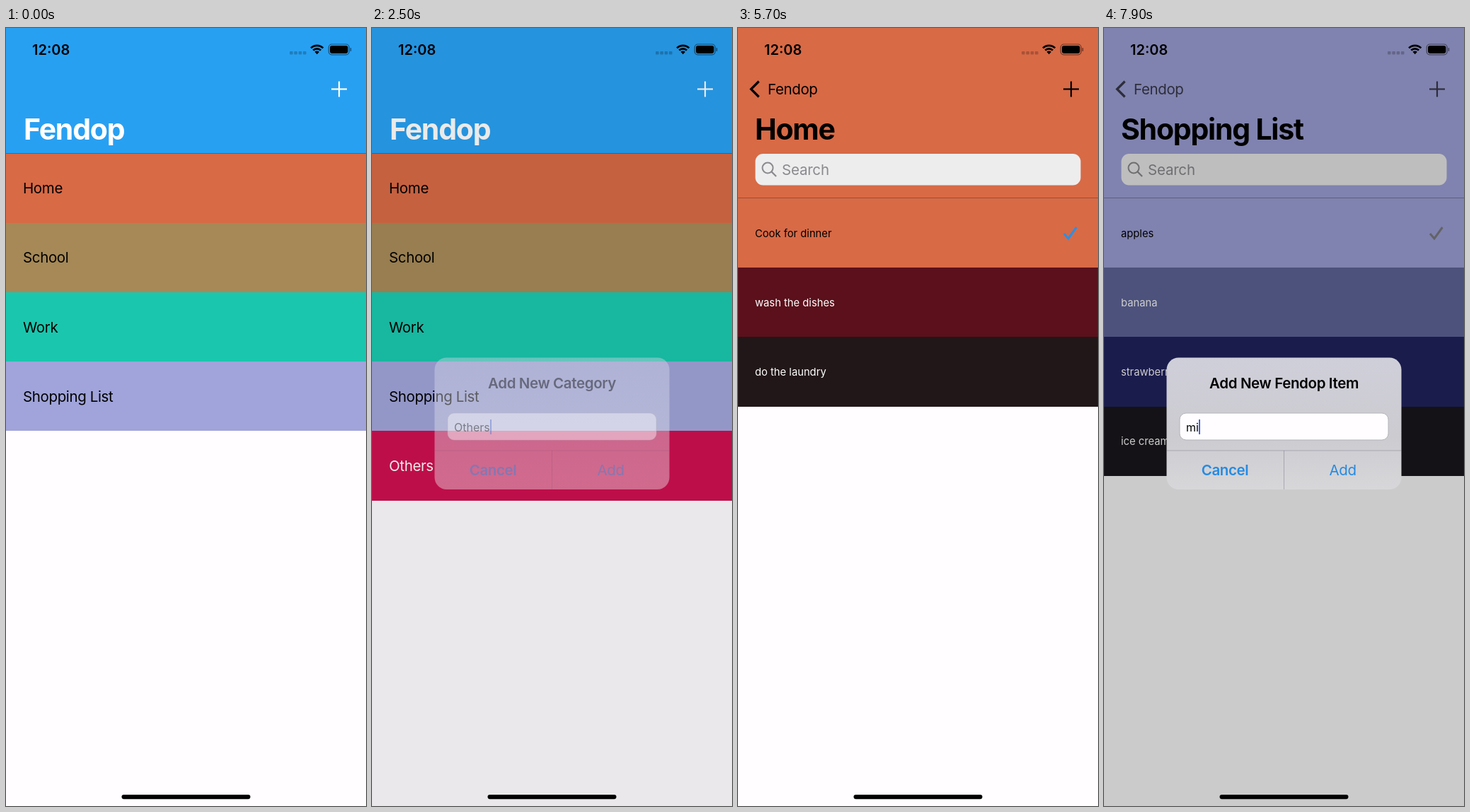
Animation of 509 by 1101 pixels, one loop 8000 ms. Source, as an HTML page with a canvas:

```html
<!DOCTYPE html>
<html lang="en">
<head>
<meta charset="utf-8">
<title>To-do lists</title>
<style>
  html, body { margin: 0; width: 100%; height: 100%; overflow: hidden; background: #fffdff; }
  canvas { display: block; width: 509px; height: 1101px; }
</style>
</head>
<body>
<canvas id="stage"></canvas>
<script>
const W = 509, H = 1101, ROW = 98.25, LOOP = 8000, STEP = 100;
const APP = 'Fendop', BLUE = '#28a0f2', LINK = '#248ae2', PAPER = '#fffdff';
const canvas = document.getElementById('stage');
const ctx = canvas.getContext('2d');
const dpr = window.devicePixelRatio || 1;
canvas.width = W * dpr;
canvas.height = H * dpr;

const categories = [
  ['Home', '#d86a46'], ['School', '#a68957'], ['Work', '#1ac7ae'],
  ['Shopping List', '#a0a4da'], ['Others', '#cf0f50', '#fff'],
];
const home = {
  title: 'Home', color: '#d86a46',
  items: [['Cook for dinner', '#d86a46'], ['clean the bedroom', '#982719', '#fff'],
    ['wash the dishes', '#5b101b', '#fff'], ['do the laundry', '#211718', '#fff']],
};
const shop = {
  title: 'Shopping List', color: '#a0a4da',
  items: [['apples', '#a0a4da'], ['banana', '#5f679b', '#fff'],
    ['strawberries', '#20235f', '#fff'], ['ice cream', '#19161b', '#fff']],
};

const clamp = v => Math.min(1, Math.max(0, v));
const ramp = (t, from, to) => clamp((t - from) / (to - from));
const smooth = v => v * v * (3 - 2 * v);
const lerp = (a, b, v) => a + (b - a) * v;
const mix = (a, b, v) => `color-mix(in srgb, ${a}, ${b} ${v * 100}%)`;

// Critically damped spring from 0 to 1.
function spring(ms) {
  if (ms <= 0) return 0;
  if (ms > 620) return 1;
  const x = ms * 0.016;
  return 1 - (1 + x) * Math.exp(-x);
}

function rect(x, y, w, h, fill) {
  const left = Math.round(x), top = Math.round(y);
  ctx.fillStyle = fill;
  ctx.fillRect(left, top, Math.round(x + w) - left, Math.round(y + h) - top);
}

function round(x, y, w, h, r, fill, stroke) {
  ctx.beginPath();
  ctx.roundRect(x, y, w, h, r);
  if (fill) { ctx.fillStyle = fill; ctx.fill(); }
  if (stroke) { ctx.strokeStyle = stroke; ctx.stroke(); }
}

function line(points, color, width) {
  ctx.beginPath();
  points.forEach(([x, y]) => ctx.lineTo(x, y));
  ctx.strokeStyle = color;
  ctx.lineWidth = width;
  ctx.stroke();
}

// Text centred on cap height at y.
function text(str, x, y, size, { color = '#000', weight = 400, track = 0, align = 'left' } = {}) {
  ctx.font = `${weight} ${size}px Inter, Roboto, sans-serif`;
  ctx.letterSpacing = `${track * size}px`;
  ctx.textAlign = align;
  ctx.fillStyle = color;
  ctx.fillText(str, x, y + size * 0.364);
  return ctx.measureText(str).width;
}

function faded(alpha, draw) {
  if (alpha <= 0) return;
  ctx.save();
  ctx.globalAlpha *= alpha;
  draw();
  ctx.restore();
}

function drawCategories(s) {
  const x = -0.3 * W * s.push;
  rect(0, 0, W, H, PAPER);
  categories.slice(0, s.count).forEach(([name, color, ink], i) => {
    const y = 177.3 + i * ROW;
    rect(0, y, W, ROW, s.pressed === i ? '#d0cfd4' : color);
    text(name, x + 24, y + 49.3, 20.5, { color: ink, track: -0.018 });
  });
  rect(0, 0, W, H, `rgba(0,0,0,${0.1 * s.push})`);
}

function drawSwiped(y, height, swipe) {
  const edge = W * (1 - swipe);
  rect(edge, y, W - edge, height, '#ff3b30');
  if (height > 60) {
    text('Delete', edge + Math.min(45, (W - edge) / 2), y + height / 2, 17,
      { color: '#fff', align: 'center' });
  }
}

function drawItems(s) {
  const left = W * (1 - s.push);
  ctx.save();
  ctx.beginPath();
  ctx.rect(left, 0, W, H);
  ctx.clip();
  rect(left, 0, W, H, PAPER);
  let y = 240.8;
  s.list.items.forEach(([name, color, ink], i) => {
    const leaving = s.list === home && i === 1;
    const height = leaving ? ROW * (1 - s.collapse) : ROW;
    const x = left - (leaving ? W * s.swipe : 0);
    if (height < 0.5) return;
    ctx.save();
    ctx.beginPath();
    ctx.rect(0, Math.round(y), W, Math.round(y + height) - Math.round(y));
    ctx.clip();
    rect(x, y, W, ROW, color);
    text(name, x + 24, y + 49.5, 14.75, { color: ink });
    if (leaving && s.swipe > 0) drawSwiped(y, height, s.swipe);
    ctx.restore();
    if (i === 0) {
      line([[x + 461, 291], [x + 467, 298], [x + 478.5, 282]],
        mix('#2a90e6', '#7c7c80', s.alert), 3);
    }
    y += height;
  });
  ctx.restore();
  const shade = ctx.createLinearGradient(left - 11, 0, left, 0);
  shade.addColorStop(0, 'rgba(0,0,0,0)');
  shade.addColorStop(1, 'rgba(0,0,0,.06)');
  rect(left - 11, 177, 11, H - 177, shade);
}

function drawSearch(x) {
  const gray = '#8a8a8e';
  round(x + 24.5, 178, 460, 44.5, 11, '#ededee');
  ctx.beginPath();
  ctx.arc(x + 42, 198, 7.5, 0, 7);
  ctx.strokeStyle = gray;
  ctx.lineWidth = 2;
  ctx.stroke();
  line([[x + 47.3, 203.3], [x + 54, 210]], gray, 2.3);
  text('Search', x + 62, 200.5, 20.5, { color: gray, track: -0.01 });
}

function drawBar(s) {
  const p = s.push, height = lerp(177.5, 241, p), slide = W * (1 - p);
  const dark = mix('#000', '#38384a', s.alert);
  rect(0, 0, W, height, mix(BLUE, s.list.color, p));
  rect(0, height - 1, W, 1, `rgba(0,0,0,${p > 0 && p < 1 ? 0.08 : 0.28})`);

  ctx.save();
  ctx.beginPath();
  ctx.rect(0, 0, W, height);
  ctx.clip();
  faded(p, () => {
    text(s.list.title, 24 + slide, 143, 41, { weight: 700, track: -0.03 });
    drawSearch(slide);
  });
  ctx.restore();

  // The large title shrinks into the back button.
  const x = lerp(25, 42, p), y = lerp(143, 86.5, p), size = lerp(41, 20.5, p);
  faded(1 - p, () => text(APP, x, y, size, { color: '#fff', weight: 700, track: -0.03 }));
  faded(p * s.back, () => {
    text(APP, x, y, size, { track: -0.018, color: dark });
    line([[29.5, 75.5], [18.5, 86.5], [29.5, 97.5]], dark, 3.2);
  });

  faded(s.plus, () => {
    const ink = mix('#fff', dark, p);
    line([[460, 86.5], [482, 86.5]], ink, 2.2);
    line([[471, 75.5], [471, 97.5]], ink, 2.2);
  });
}

function drawAlert(s) {
  if (s.alert <= 0) return;
  const inList = s.push > 0.5, cx = 254.5, cy = 559.5;
  rect(0, 0, W, H, `rgba(0,0,0,${0.2 * s.alert})`);
  faded(s.alert, () => {
    ctx.translate(cx, cy);
    ctx.scale(s.zoom, s.zoom);
    ctx.translate(-cx, -cy);
    const glass = ctx.createLinearGradient(0, 466, 0, 653);
    const tones = inList ? ['#cfcfda', '#cccbd0', '#d7d6d9'] : ['#d5d8e8', '#e2e3ec', '#ebebed'];
    tones.forEach((c, i) => glass.addColorStop([0, 0.6, 1][i], c));
    round(88.5, 466.5, 332, 186.5, 17, glass);
    text(inList ? `Add New ${APP} Item` : 'Add New Category', cx, 503, 20.5,
      { weight: 600, track: -0.018, align: 'center' });
    ctx.lineWidth = 1;
    round(107, 545, 295, 38, 9, PAPER, '#b4b4b9');
    const width = text(s.typed, 116, 565, 16);
    rect(116 + width, 554, 2.4, 21, '#4668c8');
    const rule = 'rgba(60,60,80,.28)';
    line([[88.5, 598], [420.5, 598]], rule, 1);
    line([[254.5, 598], [254.5, 653]], rule, 1);
    text('Cancel', 171, 625.5, 20.5, { color: LINK, weight: 600, track: -0.018, align: 'center' });
    text('Add', 337.5, 625.5, 20.5, { color: LINK, track: -0.018, align: 'center' });
  });
}

function drawStatus() {
  text('12:08', 37, 30.5, 20, { weight: 600 });
  for (let i = 0; i < 4; i++) round(401 + i * 6.3, 33, 4.6, 4.6, 1, 'rgba(0,0,0,.22)');
  const from = -Math.PI * 0.75, to = -Math.PI * 0.25;
  ctx.strokeStyle = ctx.fillStyle = '#000';
  ctx.lineWidth = 2.7;
  for (const r of [7.7, 12.2]) {
    ctx.beginPath();
    ctx.arc(439.7, 37, r, from, to);
    ctx.stroke();
  }
  ctx.beginPath();
  ctx.moveTo(439.7, 37.3);
  ctx.arc(439.7, 37, 4.6, from, to);
  ctx.fill();
  ctx.lineWidth = 1.2;
  round(456.2, 23, 29, 14.8, 4.5, null, 'rgba(0,0,0,.5)');
  round(458, 24.9, 25.4, 11, 2.8, '#000');
  round(486.6, 28, 1.6, 5, 1, 'rgba(0,0,0,.5)');
  round(163.5, 1085, 182, 6.2, 3.1, '#000');
}

function typedAt(t) {
  const keys = t < 4000
    ? [['O', 1500], ['t', 1700], ['h', 1900], ['e', 2000], ['r', 2100], ['s', 2200]]
    : [['m', 7800], ['i', 7900]];
  return keys.filter(k => t >= k[1]).map(k => k[0]).join('');
}

function stateAt(t) {
  const second = t >= 6500;
  const opening = second ? ramp(t, 7300, 7600) : ramp(t, 900, 1250);
  const closing = second ? 0 : ramp(t, 2350, 2620);
  const firstPush = t < 5900 ? spring(t - 3180) : 1 - spring(t - 6010);
  const pressing = (a, b) => t >= a && t < b;
  return {
    list: second ? shop : home,
    push: second ? spring(t - 6660) : firstPush,
    pressed: pressing(3100, 4000) ? 0 : pressing(6600, 7300) ? 3 : -1,
    count: t < 2400 ? 4 : 5,
    alert: smooth(opening) * (1 - smooth(closing)),
    zoom: 1 + 0.15 * (1 - smooth(opening)),
    typed: typedAt(t),
    swipe: 0.6 * smooth(ramp(t, 4380, 4820)) + 0.4 * smooth(ramp(t, 4800, 5000)),
    collapse: smooth(ramp(t, 5000, 5350)),
    back: pressing(5900, 6000) ? 0.4 : 1,
    plus: pressing(900, 1000) || pressing(7300, 7400) ? 0.4 : 1,
  };
}

function render(now) {
  const t = Math.floor((now % LOOP) / STEP) * STEP;
  const s = stateAt(t);
  ctx.setTransform(dpr, 0, 0, dpr, 0, 0);
  if (s.push < 1) drawCategories(s);
  if (s.push > 0) drawItems(s);
  drawBar(s);
  drawAlert(s);
  drawStatus();
}

const start = performance.now();
function tick() {
  render(performance.now() - start);
  requestAnimationFrame(tick);
}
tick();
</script>
</body>
</html>
```
